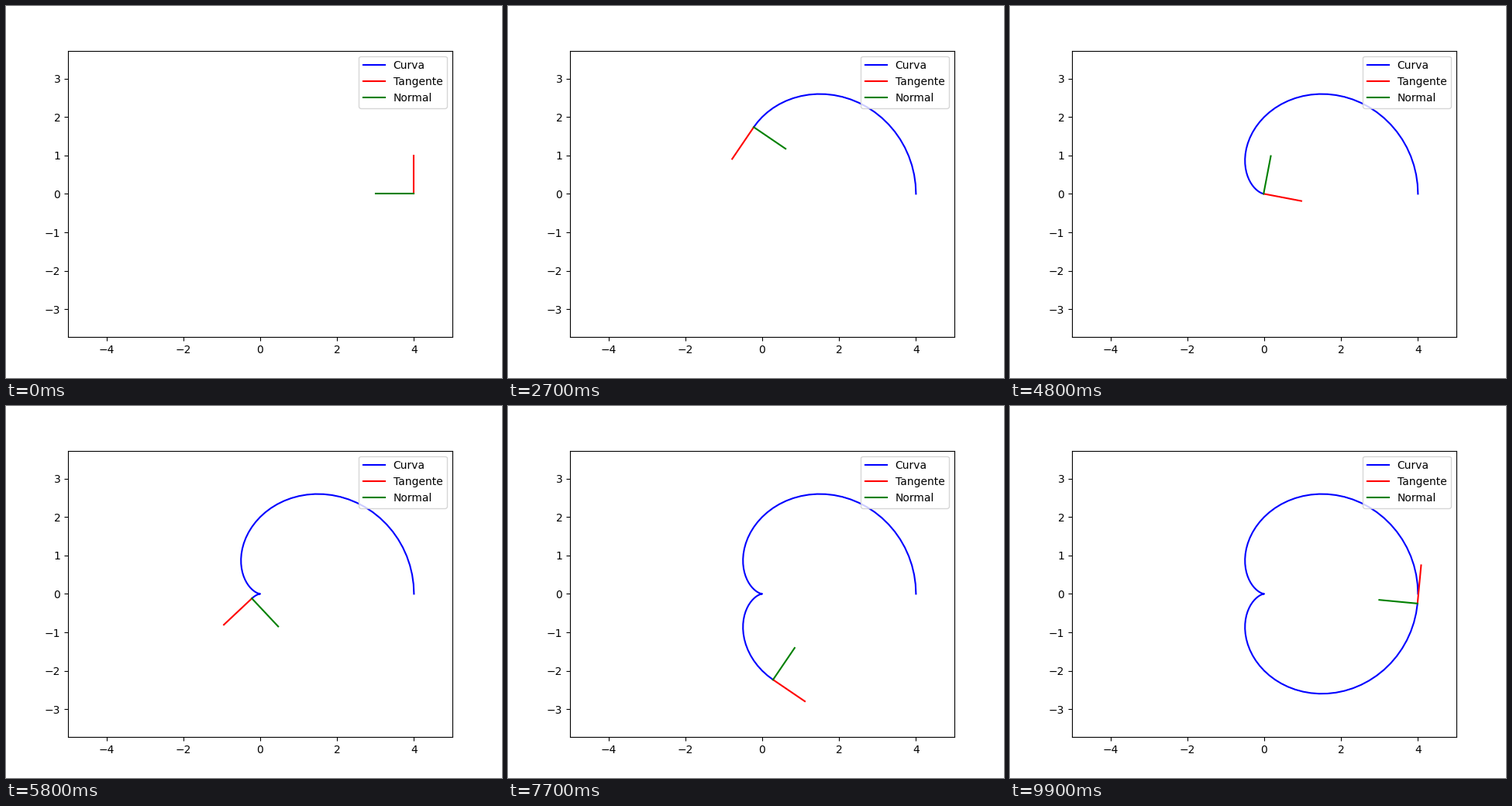
Write a matplotlib script that moves like this. It is 640 by 480 pixels and loops after 10 s.

```python
import numpy as np
import matplotlib.pyplot as plt
from matplotlib.animation import FuncAnimation

FRAMES = 100
INTERVAL = 100
HALF_W = 5
HALF_H = HALF_W * 369.6 / 496  # equal scale on both axes

t = 2 * np.pi * np.arange(FRAMES) / FRAMES
r = 2 * (1 + np.cos(t))
x, y = r * np.cos(t), r * np.sin(t)

# Tangent direction of the cardioid; it flips after the cusp at t = pi.
angle = 1.5 * t + np.pi / 2 + np.pi * (np.arange(FRAMES) > FRAMES // 2)

fig, ax = plt.subplots(figsize=(6.4, 4.8), dpi=100)
ax.set_xlim(-HALF_W, HALF_W)
ax.set_ylim(-HALF_H, HALF_H)

curve, = ax.plot([], [], color="blue", label="Curva")
tangent, = ax.plot([], [], color="red", label="Tangente")
normal, = ax.plot([], [], color="green", label="Normal")
ax.legend(loc="upper right")


def set_unit(line, px, py, a):
    line.set_data([px, px + np.cos(a)], [py, py + np.sin(a)])


def update(i):
    curve.set_data(x[:i + 1], y[:i + 1])
    set_unit(tangent, x[i], y[i], angle[i])
    set_unit(normal, x[i], y[i], angle[i] + np.pi / 2)
    return curve, tangent, normal


anim = FuncAnimation(fig, update, frames=FRAMES, interval=INTERVAL,
                     repeat=True, repeat_delay=0)
plt.show()
```
